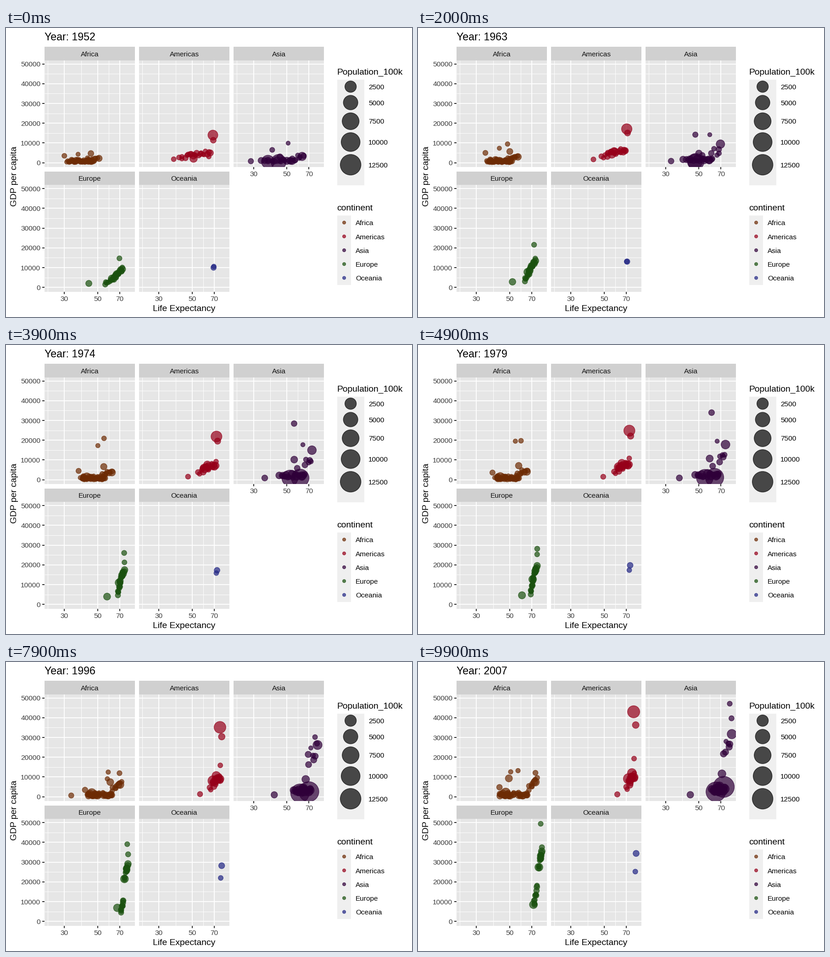
Write a matplotlib script that moves like this. It is 885x632 px and loops after 10 s.

```python
import numpy as np
import matplotlib.pyplot as plt
from matplotlib.animation import FuncAnimation
from matplotlib.patches import Circle, Rectangle

W, H, DPI = 885, 632, 64
PT = 72 / DPI            # points per pixel
FRAMES = 100
T = np.arange(FRAMES) / (FRAMES - 1)
YEAR = 1952 + 55 * T
INK, TICK, STRIP_INK = "#3c3c3c", "#242424", "#101010"
COLORS = {"Africa": "#6d2b04", "Americas": "#960019", "Asia": "#2f0039",
          "Europe": "#1a510f", "Oceania": "#222684"}
tracks = {name: [] for name in COLORS}
rng = np.random.default_rng(12)


# ---- motion: life in years, gdp in thousands, population in 100k -----------
def along(values):
    """Evenly spaced key values, sampled for every frame."""
    return np.interp(T, np.linspace(0, 1, len(values)), values)


def add(name, life, gdp, pop, growth):
    tracks[name].append((life, gdp, pop / growth + (pop - pop / growth) * T))


def swarm(name, n, life, gdp, pops, growth, link=.6, skew=1):
    """Bubbles that keep a drifting rank between a low and a high edge."""
    (life_lo, life_hi), (gdp_lo, gdp_hi) = map(along, life), map(along, gdp)
    for k in range(n):
        first = (k + rng.random()) / n
        last = np.clip(first + rng.normal(0, .2), 0, 1)
        rank = first + (last - first) * T
        wealth = (link * rank + (1 - link) * rng.random()) ** skew
        pop = pops[0] * (pops[1] / pops[0]) ** rng.random()
        add(name, life_lo + (life_hi - life_lo) * rank,
            gdp_lo + (gdp_hi - gdp_lo) * wealth, pop, growth)


def trend(name, life, gdp, pop, growth=2, life_pow=1, gdp_pow=1):
    """A steady rise from start to end, bent by a power of time."""
    add(name, life[0] + (life[1] - life[0]) * T ** life_pow,
        gdp[0] + (gdp[1] - gdp[0]) * T ** gdp_pow, pop, growth)


def path(name, pop, growth, *keys):
    """Turning points given as (year, life, gdp)."""
    years, life, gdp = zip(*keys)
    add(name, np.interp(YEAR, years, life), np.interp(YEAR, years, gdp), pop, growth)


swarm("Africa", 36, ((31, 37, 42, 43), (47, 55, 60, 65)), ((.3, .3), (2, 2.6)),
      (12, 500), 3.4, link=.2, skew=1.6)
swarm("Africa", 9, ((41, 55, 67), (52, 67, 76)), ((.8, 2, 3), (3, 5.5, 11)), (6, 800), 3)
trend("Africa", (36, 47), (1.1, 2), 1350, 4, .6)
path("Africa", 440, 3, (1952, 45, 4.7), (1987, 60.8, 7.8), (1996, 60.5, 7.4), (2007, 49.3, 9.3))
path("Africa", 124, 3, (1952, 30, 3.5), (1967, 36, 5.5), (1987, 39.9, 2.4), (2007, 42.7, 4.8))
path("Africa", 89, 3.5, (1952, 40, .5), (1987, 44, .9), (1992, 23.6, .7), (1997, 36.1, .6),
     (2007, 46.2, .9))
path("Africa", 16, 3.7, (1952, 47.6, .9), (1987, 63.6, 6.2), (2007, 50.7, 12.6))
path("Africa", 60, 6, (1952, 42.7, 2.4), (1962, 47.8, 6.8), (1967, 50.2, 18.8),
     (1977, 57.4, 22), (1987, 66.2, 11.8), (2007, 74, 12.1))
path("Africa", 15, 3.5, (1952, 37, 4.3), (1967, 44.6, 8.4), (1977, 52.8, 21.7),
     (1987, 60.2, 11.9), (2007, 56.7, 13.2))

swarm("Americas", 20, ((40, 58, 70), (66, 73, 79)), ((1.6, 2.6, 3), (6.5, 10, 13)),
      (12, 600), 2.5)
trend("Americas", (37.6, 60.9), (1.8, 1.2), 85, 2.6)
trend("Americas", (50.8, 76.2), (3.5, 12), 1087, 3.6, .8, .8)
trend("Americas", (50.9, 72.4), (2.1, 9.1), 1900, 3.3, .9, .7)
trend("Americas", (64.3, 78.7), (3.1, 19.3), 39, 1.8, .7, 1.05)
trend("Americas", (68.8, 80.7), (11.4, 36.3), 334, 2.2, 1, 1.2)
trend("Americas", (68.4, 78.2), (14, 43), 3011, 1.9, 1, 1.4)

swarm("Asia", 17, ((33, 47, 61), (58, 68, 74)), ((.3, .6, 1), (2, 4.5, 7)),
      (30, 1800), 2.6, link=.4, skew=1.3)
swarm("Asia", 4, ((44, 61, 75), (66, 74, 81)), ((1, 6, 22), (4.5, 14, 29)), (30, 400), 2.4)
trend("Asia", (28.8, 43.8), (.8, 1), 319, 3.5, .85)
trend("Asia", (37.4, 64.7), (.5, 2.5), 11104, 3, .65, 2)
trend("Asia", (50.9, 75.6), (9.9, 28), 7, 5, .7, .9)
trend("Asia", (60.4, 80), (2.3, 47.1), 46, 4, .8, 2.1)
trend("Asia", (61, 82.2), (3, 39.7), 70, 3, .7, 1.9)
trend("Asia", (63, 82.6), (3.2, 31.7), 1275, 1.5, .7, .95)
path("Asia", 695, 4, (1952, 44.9, 3), (1962, 49.3, 4.2), (1977, 57.7, 11.9),
     (1987, 63, 6.6), (2007, 71, 11.6))
path("Asia", 276, 6, (1952, 39.9, 6.5), (1967, 49.9, 16.9), (1977, 58.7, 34.2),
     (1982, 63, 33.7), (1987, 66.3, 21.2), (2007, 72.8, 21.7))
path("Asia", 13187, 2.4, (1952, 44, .4), (1957, 50.5, .6), (1962, 44.5, .5),
     (1967, 58.4, .6), (1992, 68.7, 1.7), (2007, 73, 5))

swarm("Europe", 17, ((62, 71, 78), (73, 76, 81.5)), ((3.5, 11.5, 26), (10.5, 21.5, 37.5)),
      (30, 800), 1.3, link=.75)
swarm("Europe", 11, ((55, 67, 70, 72), (67, 71, 73, 77)),
      ((1, 2.2, 3.4, 3.8, 3, 6), (6, 10, 14, 16.5, 13, 22)), (30, 400), 1.3, link=.75)
trend("Europe", (43.6, 71.8), (2, 8.5), 712, 3.2, .75, 1.3)
trend("Europe", (69.6, 81.7), (14.7, 37.5), 75, 1.5, .9, .75)
trend("Europe", (72.7, 80.2), (10.1, 49.4), 46, 1.4, 1.2, 1.35)

trend("Oceania", (69.1, 81.2), (10, 34.4), 204, 2.3, 1.25, 1.3)
trend("Oceania", (69.4, 80.2), (10.6, 25.2), 41, 2, 1.5, 1.1)


# ---- drawing ---------------------------------------------------------------
plt.rcParams["font.family"] = "Liberation Sans"
fig = plt.figure(figsize=(W / DPI, H / DPI), dpi=DPI, facecolor="white")
ax = fig.add_axes((0, 0, 1, 1))
ax.set(xlim=(0, W), ylim=(H, 0), autoscale_on=False)
ax.axis("off")

PW, PH, STRIP = 196.6, 233.4, 29.7
LEFT, TOP = (84, 290.2, 496.4), (70.8, 343.4)
LIFE_TICKS = (30, 50, 70)
SMALL, MEDIUM, LARGE = 15.4, 19.25, 23.1
STROKE = 1.24


def px(left, life):
    return left + 43.2 + 142.66 * np.log(np.asarray(life) / 30)


def py(top, gdp):
    return top + PH - 9.57 - 4.32 * np.asarray(gdp)


def diameter(pop):
    size = 2 + 10 * np.sqrt(np.clip(np.asarray(pop) - .6, 0, None) / 13186)
    return 3.735 * size + STROKE


def box(x, y, w, h, color):
    return ax.add_patch(Rectangle((x, y), w, h, fc=color, ec="none", lw=0, zorder=1))


def line(xs, ys, color, width):
    ax.plot(xs, ys, color=color, lw=width * PT, solid_capstyle="butt", zorder=2)


def label(x, y, s, size, color="black", ha="left"):
    """Text whose capitals are centred on y."""
    return ax.text(x, y + .36 * size, s, size=size * PT, color=color,
                   ha=ha, va="baseline", zorder=5)


def key_dot(x, y, d, color):
    ax.add_patch(Circle((x, y), d / 2, fc=color, ec=color, lw=STROKE * PT,
                        alpha=.7, zorder=3))


def x_axis(left, bottom):
    for v in LIFE_TICKS:
        x = px(left, v)
        line((x, x), (bottom, bottom + 4.8), TICK, 1.87)
        label(x, bottom + 14.2, str(v), SMALL, INK, "center")


def y_axis(top):
    for v in range(0, 60, 10):
        y = py(top, v)
        line((LEFT[0] - 4.8, LEFT[0]), (y, y), TICK, 1.87)
        label(LEFT[0] - 8.7, y, str(v * 1000), SMALL, INK, "right")


def panel(name, left, top):
    box(left, top - STRIP, PW, STRIP, "#d0d0d0")
    label(left + PW / 2, top - STRIP / 2 + .2, name, SMALL, STRIP_INK, "center")
    back = box(left, top, PW, PH, "#e6e6e6")
    minor = 30 * np.sqrt(.6), np.sqrt(30 * 50), np.sqrt(50 * 70)
    for xs, ys, width in ((minor, range(5, 50, 10), .93),
                          (LIFE_TICKS, range(0, 60, 10), 1.87)):
        for y in py(top, ys):
            line((left, left + PW), (y, y), "white", width)
        for x in px(left, xs):
            line((x, x), (top, top + PH), "white", width)
    life, gdp, pop = (np.array(a) for a in zip(*tracks[name]))
    spots = np.stack((px(left, life), py(top, gdp)), axis=-1)
    areas = (diameter(pop) * PT) ** 2
    color = [COLORS[name]]
    dots = ax.scatter(*spots[:, 0].T, s=areas[:, 0], c=color, edgecolors=color,
                      alpha=.7, linewidths=STROKE * PT, zorder=3)
    dots.set_clip_path(back)
    return dots, spots, areas


panels = [panel(name, LEFT[i % 3], TOP[i // 3]) for i, name in enumerate(COLORS)]
for top in TOP:
    y_axis(top)
for left, top in zip(LEFT, (TOP[1], TOP[1], TOP[0])):
    x_axis(left, top + PH)

title = label(83.5, 18.5, "", LARGE)
label(388.5, 612, "Life Expectancy", MEDIUM, ha="center")
ax.text(23.5, 324, "GDP per capita", size=MEDIUM * PT, rotation=90,
        rotation_mode="anchor", ha="center", va="baseline")

label(721, 95, "Population_100k", MEDIUM)
box(722, 112.5, 58.5, 231.5, "#efefef")
y = 112.5
for pop in range(2500, 15000, 2500):
    d = diameter(pop)
    cell = max(30.2, d + 6.5)
    key_dot(751.2, y + cell / 2, d, "black")
    label(790, y + cell / 2, str(pop), SMALL)
    y += cell

label(721.5, 392.5, "continent", MEDIUM)
box(722, 410.3, 30.2, 151.4, "#efefef")
for i, (name, color) in enumerate(COLORS.items()):
    y = 425.5 + 30.25 * i
    key_dot(737.1, y, 6.84, color)
    label(762, y + .3, name, SMALL)


def update(i):
    title.set_text(f"Year: {round(YEAR[i])}")
    for dots, spots, areas in panels:
        dots.set_offsets(spots[:, i])
        dots.set_sizes(areas[:, i])
    return []


anim = FuncAnimation(fig, update, frames=FRAMES, interval=100, repeat=True)
plt.show()
```
